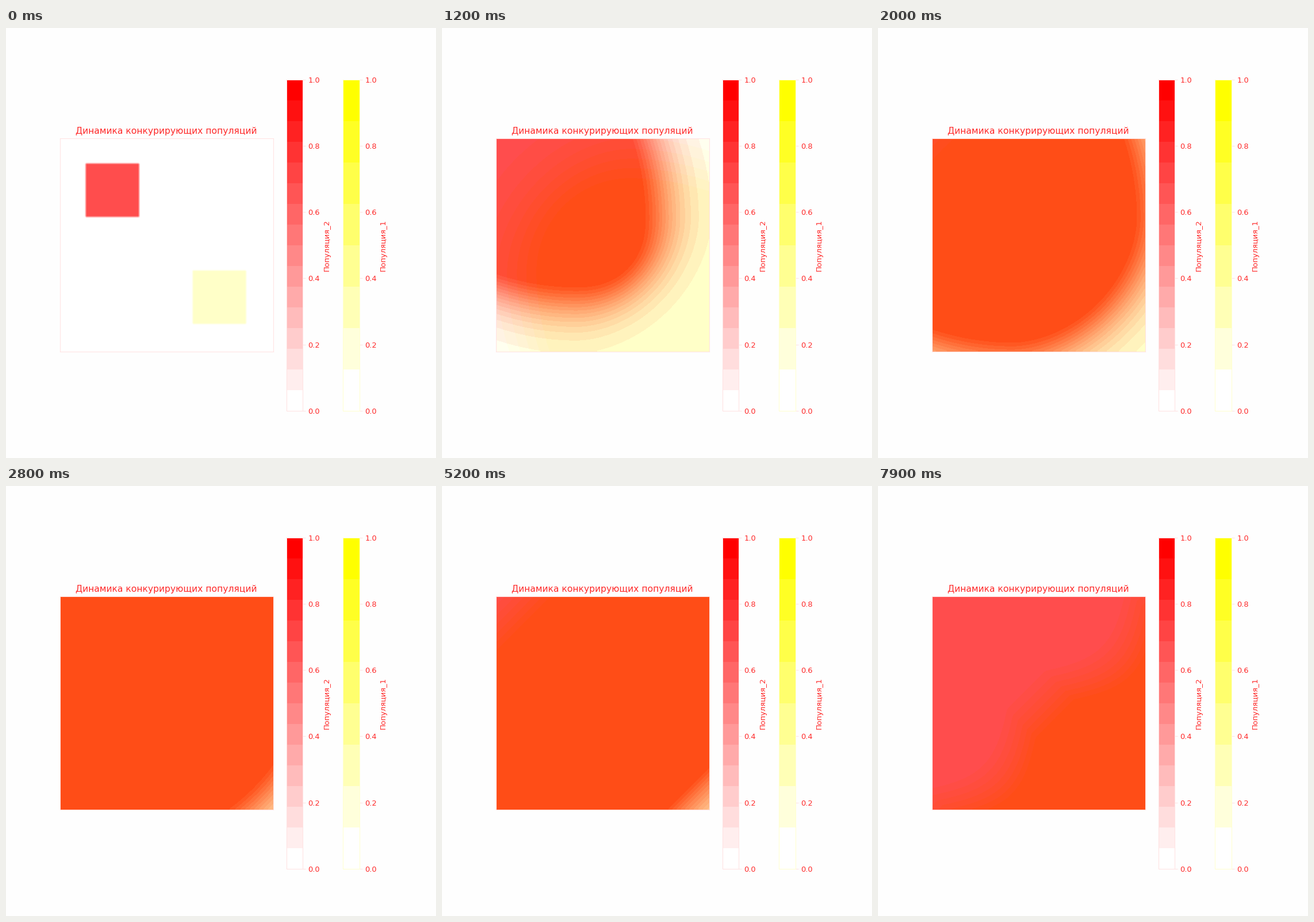
Write a matplotlib script that moves like this. It is 748 px wide and 748 px high and loops after 8000 ms.

```python
import numpy as np
import matplotlib.pyplot as plt
from matplotlib.animation import FuncAnimation
from matplotlib.cm import ScalarMappable
from matplotlib.colors import LinearSegmentedColormap, Normalize

N, FRAMES = 100, 80
FULL, DECLINE = 12, 44      # frames: growth at full strength, start of decline
TEXT, PALE = "#ff2a2a", "#ffe2e2"
plt.rcParams.update({"font.family": "DejaVu Sans", "text.color": TEXT,
                     "axes.labelcolor": TEXT})

yy, xx = np.mgrid[0:N, 0:N].astype(float)
diagonal = xx + yy
norm = Normalize(0, 1)
yellow = LinearSegmentedColormap.from_list("yellow", ["white", "yellow"], N=8)
red = LinearSegmentedColormap.from_list("red", ["white", "red"], N=16)


def spread_distance(centre=37):
    """Distance from the colony core; contours get rounder farther out."""
    dx, dy = np.maximum(xx - centre, 0), np.maximum(yy - centre, 0)
    p = 1.75 + 1.3 * np.exp(-(np.hypot(dx, dy) - 22) / 13)
    p = np.minimum(p, 4)
    behind = np.maximum(centre - xx, 0) ** 2 + np.maximum(centre - yy, 0) ** 2
    return (dx ** p + dy ** p) ** (1 / p) + 0.0044 * behind


def colony(start):
    inside = slice(start, start + N // 4)
    mask = np.zeros((N, N), bool)
    mask[inside, inside] = True
    return mask


RED_DISTANCE = spread_distance()
YELLOW_DISTANCE = RED_DISTANCE[::-1, ::-1]
RED_CORE, YELLOW_CORE = colony(N // 8), colony(5 * N // 8)


def growth(distance, core, strength, front, width):
    """A logistic wave front, capped at the capacity of one."""
    wave = 1.35 * strength / (1 + np.exp((distance - front) / width))
    return np.where(core, 1, np.minimum(wave, 1))


def retreat(position, edge):
    """Density left behind a front of decline that has advanced to `edge`."""
    return np.clip(1 + (position - edge - 2) / 38, 0, 1) ** 1.3


def yellow_population(t):
    strength = min(t / FULL, 1) ** 2
    front = 115 * (1 - np.exp(-0.13 * (t - 7.5)))
    grown = growth(YELLOW_DISTANCE, YELLOW_CORE, strength, front, 12)
    bend = np.clip((np.abs(xx - yy) - 18) / 75, 0, 1)
    bump = 15 * np.sin(np.pi * bend) * np.clip((t - 52) / 27, 0, 1)
    return np.minimum(grown, retreat(diagonal - bump, 3.3 * (t - DECLINE)))


def red_population(t):
    s = min(t, 48)
    front = -11.5 + 4.8 * s - 0.049 * s ** 2
    grown = growth(RED_DISTANCE, RED_CORE, min(t / FULL, 1), front, 8)
    phase = np.clip((t - DECLINE + 1) / 23, 0, 1)
    edge = 24 * np.sin(np.pi * phase) - 4
    return np.minimum(grown, retreat(2 * (N - 1) - diagonal, edge))


def add_bar(cmap, label, outline):
    bar = fig.colorbar(ScalarMappable(norm, cmap), ax=ax, label=label)
    bar.outline.set_edgecolor(outline)
    bar.ax.tick_params(color=PALE, labelcolor=TEXT)


fig, ax = plt.subplots(figsize=(8, 8), dpi=93.5, facecolor="#fefefe")
fig.subplots_adjust(left=0.125, right=0.9, bottom=0.11, top=0.88)
layers = [(ax.imshow(population(0), cmap=cmap, norm=norm, alpha=0.7,
                     interpolation="bilinear", interpolation_stage="data"),
           population)
          for population, cmap in ((yellow_population, yellow),
                                   (red_population, red))]
add_bar(yellow, "Популяция_1", "#ffffd0")
add_bar(red, "Популяция_2", PALE)
ax.set_title("Динамика конкурирующих популяций")
ax.set(xticks=[], yticks=[])
for spine in ax.spines.values():
    spine.set_edgecolor(PALE)


def update(t):
    for image, population in layers:
        image.set_data(population(t))
    return [image for image, _ in layers]


anim = FuncAnimation(fig, update, frames=FRAMES, interval=100,
                     repeat=True, repeat_delay=0)
plt.show()
```
